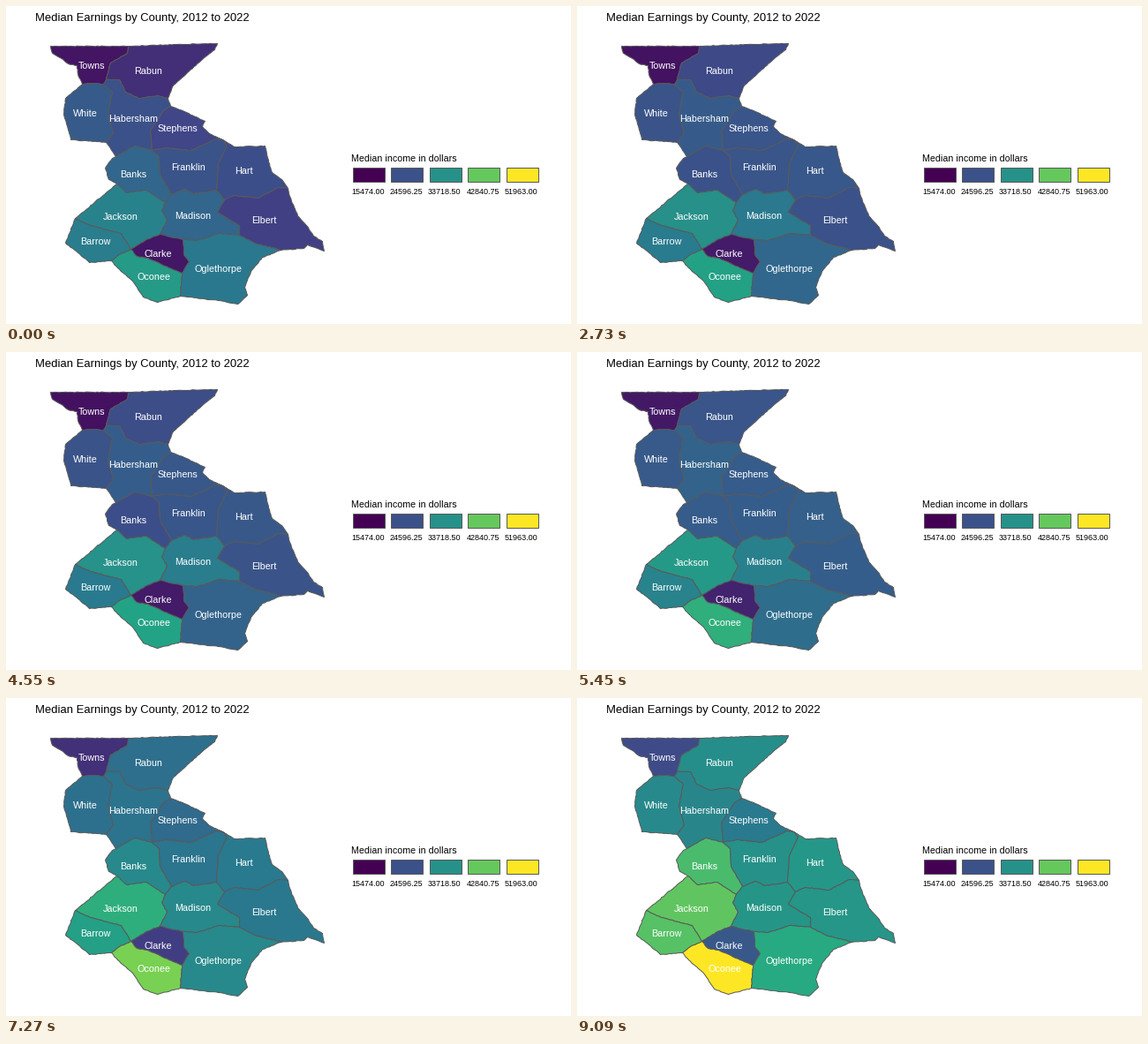
Write a matplotlib script that moves like this. It is 640 px wide and 360 px high and loops after 10000 ms.

```python
import random

import matplotlib.pyplot as plt
import numpy as np
from matplotlib.animation import FuncAnimation
from matplotlib.colors import LinearSegmentedColormap
from matplotlib.patches import Polygon, Rectangle

W, H, DPI = 640, 360, 100
LOOP_MS, FRAMES, YEARS = 10000, 250, 11
EDGE = "#595959"

random.seed(12)
plt.rcParams["font.family"] = "Liberation Sans"
scale = LinearSegmentedColormap.from_list(
    "income", plt.get_cmap("viridis")(np.linspace(0, 1, 6)))

# Points where three or more areas meet
joints = dict(zip("ABCDEFGHIJKLMNOPQRSTUVWXY", [
    (138, 45), (86, 88), (110, 88), (113, 83), (183, 104),
    (186, 113), (113, 154), (124, 170), (165, 163), (245, 151),
    (238, 208), (187, 213), (180, 222), (125, 201), (78, 240),
    (141, 275), (119, 288), (197, 328), (199, 302), (200, 264),
    (174, 258), (264, 259), (247, 219), (319, 206), (311, 276)]))
borders = []


def px(size):
    return size * 72 / DPI


def roughen(pts, step=2.5, amp=0.4):
    """Break a line into short pieces and nudge the inner points."""
    out = [pts[0]]
    for p, q in zip(pts, pts[1:]):
        n = max(1, int(np.hypot(q[0] - p[0], q[1] - p[1]) / step))
        for k in range(1, n):
            out.append(tuple(a + (b - a) * k / n + random.uniform(-amp, amp)
                             for a, b in zip(p, q)))
        out.append(q)
    return out


def border(ends, names, *xy):
    """A line between two joints; a single name faces the outside."""
    pts = [joints[ends[0]], *zip(xy[::2], xy[1::2]), joints[ends[1]]]
    borders.append((ends, names.split(), roughen(pts)))


def outline(name):
    """Chain all borders of a county into one closed ring."""
    parts = [(ends, pts) for ends, names, pts in borders if name in names]
    ends, pts = parts.pop(0)
    ring, tip = list(pts), ends[1]
    while parts:
        ends, pts = part = next(p for p in parts if tip in p[0])
        parts.remove(part)
        forward = ends[0] == tip
        ring += pts[1:] if forward else pts[-2::-1]
        tip = ends[1] if forward else ends[0]
    return np.array(ring)


def label_spot(ring):
    """Middle of the widest chord at half height."""
    y = (ring[:, 1].min() + ring[:, 1].max()) / 2
    xs = sorted(x0 + (x1 - x0) * (y - y0) / (y1 - y0)
                for (x0, y0), (x1, y1) in zip(ring, np.roll(ring, -1, axis=0))
                if (y0 > y) != (y1 > y))
    left, right = max(zip(xs[::2], xs[1::2]), key=lambda c: c[1] - c[0])
    return (left + right) / 2, y


# Outer edge
border("AB", "Towns", 50, 45, 52, 53, 64, 60, 70, 65, 80, 67, 81, 77)
border("AE", "Rabun", 190, 43, 239, 42, 236, 49, 222, 60, 205, 75, 188, 91)
border("EF", "Habersham")
border("FJ", "Stephens", 204, 120, 225, 130, 222, 136, 230, 144)
border("JX", "Hart", 258, 159, 293, 158, 297, 176, 301, 188, 312, 196)
border("XY", "Elbert", 321, 215, 330, 237, 340, 248, 348, 260, 358, 266,
       360, 277, 341, 270, 337, 274)
border("YR", "Oglethorpe", 290, 284, 277, 300, 270, 318, 273, 327, 262, 337,
       240, 333)
border("RQ", "Oconee", 171, 335, 155, 329, 143, 311, 126, 296)
border("QO", "Barrow", 94, 290, 79, 277, 67, 268)
border("ON", "Jackson")
border("NH", "Banks", 116, 196, 112, 183, 120, 172)
border("HG", "Habersham")
border("GB", "White", 73, 151, 65, 122, 67, 104, 75, 97)

# Between neighbours
border("AD", "Towns Rabun", 137, 53, 118, 64)
border("BC", "Towns White", 97, 87)
border("CD", "Towns Habersham")
border("DE", "Rabun Habersham", 128, 83, 135, 97, 150, 104, 172, 101)
border("CG", "White Habersham", 120, 97, 115, 122, 121, 143)
border("FI", "Habersham Stephens", 178, 118, 163, 141)
border("HI", "Habersham Banks", 145, 158)
border("JI", "Stephens Franklin", 238, 150, 209, 163, 180, 160)
border("IL", "Banks Franklin", 173, 170, 174, 190)
border("JK", "Franklin Hart", 250, 157, 240, 178)
border("LK", "Franklin Madison", 202, 207, 212, 212)
border("KW", "Hart Madison")
border("XW", "Hart Elbert", 308, 205, 285, 217, 258, 214)
border("WV", "Madison Elbert", 239, 233, 264, 248)
border("LM", "Banks Madison")
border("NM", "Banks Jackson", 136, 211, 158, 208)
border("MU", "Jackson Madison", 176, 231, 182, 242)
border("UP", "Jackson Clarke", 157, 265)
border("OP", "Jackson Barrow", 95, 248, 130, 257)
border("QP", "Barrow Oconee", 128, 281)
border("UT", "Clarke Madison", 190, 262)
border("PS", "Clarke Oconee", 148, 283, 160, 285, 184, 296)
border("TS", "Clarke Oglethorpe", 201, 281, 207, 289)
border("SR", "Oconee Oglethorpe")
border("TV", "Madison Oglethorpe", 216, 265, 240, 257)
border("YV", "Elbert Oglethorpe", 281, 268)

fig = plt.figure(figsize=(W / DPI, H / DPI), dpi=DPI, facecolor="white")
ax = fig.add_axes([0, 0, 1, 1])
ax.set(xlim=(-0.5, W - 0.5), ylim=(H - 0.5, -0.5))
ax.axis("off")
shapes = []


def label(x, baseline, text, size, color="black", ha="center"):
    ax.text(x - 0.7, baseline, text, fontsize=px(size), color=color, ha=ha,
            va="baseline", zorder=3)


def county(name, start, middle, end):
    """Levels are places on the colour scale in 2012, 2017 and 2022."""
    ring = outline(name)
    shape = ax.add_patch(Polygon(ring, closed=True, ec=EDGE, lw=px(1)))
    x, y = label_spot(ring)
    label(x, y + 4, name, 10.8, "white")
    shapes.append((shape, start, middle, end))


county("Towns", .06, .05, .23)
county("Rabun", .14, .235, .49)
county("White", .29, .26, .47)
county("Habersham", .25, .30, .46)
county("Stephens", .21, .28, .41)
county("Banks", .33, .24, .69)
county("Franklin", .26, .27, .50)
county("Hart", .24, .28, .53)
county("Jackson", .44, .51, .74)
county("Madison", .33, .42, .52)
county("Elbert", .19, .265, .525)
county("Barrow", .42, .41, .72)
county("Clarke", .07, .08, .28)
county("Oconee", .54, .58, 1)
county("Oglethorpe", .40, .32, .61)

label(33, 17, "Median Earnings by County, 2012 to 2022", 13.05, ha="left")
label(391, 176, "Median income in dollars", 10.6, ha="left")
for i, dollars in enumerate(np.linspace(15474, 51963, 5)):
    x = 392 + 43.5 * i
    ax.add_patch(Rectangle((x, 182), 36, 16, fc=scale(i / 4), ec=EDGE,
                           lw=px(1)))
    label(x + 18, 212.5, f"{dollars:.2f}", 9)


def level(year, start, middle, end):
    """Settle from start to middle, then climb to the end."""
    half = YEARS // 2
    if year <= half:
        return start + (middle - start) * (1 - (1 - year / half) ** 2)
    return middle + (end - middle) * (year / half - 1) ** 1.3


def draw(frame):
    year = int((frame + 0.9) * YEARS / FRAMES)
    for shape, *levels in shapes:
        shape.set_facecolor(scale(float(level(year, *levels))))
    return [shape for shape, *_ in shapes]


anim = FuncAnimation(fig, draw, frames=FRAMES, interval=LOOP_MS / FRAMES,
                     repeat=True, repeat_delay=0, blit=False)
plt.show()
```
